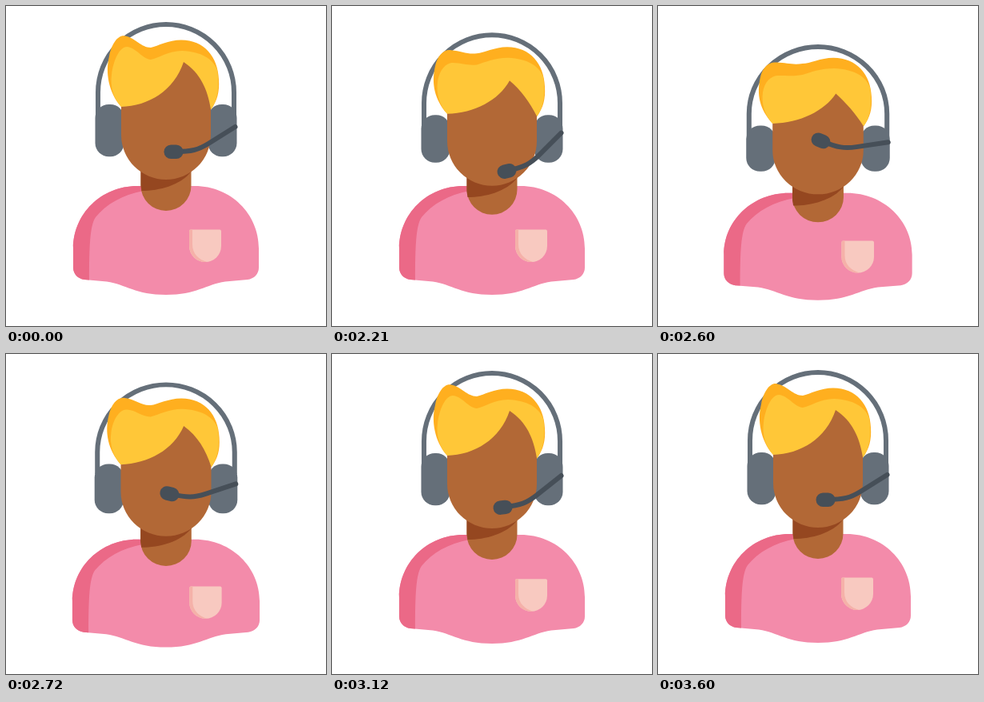
Animation, 400 px wide and 400 px high, one loop 3690 ms. Source, as an HTML page:

```html
<!DOCTYPE html>
<html lang="en">
<head>
<meta charset="utf-8">
<title>Support agent</title>
<style>
  html, body { margin: 0; width: 100%; height: 100%; overflow: hidden; background: #fff; }
  svg { display: block; width: 100vw; height: 100vh; }
</style>
</head>
<body>
<svg viewBox="0 0 400 400">
  <g id="figure">
    <g id="band"><path d="M115 136V108A85 85 0 0 1 285 108V136" fill="none" stroke="#656f79" stroke-width="6"/></g>
    <g fill="#656f79">
      <rect class="pad" x="111.5" width="36" rx="17"/>
      <rect class="pad" x="252.5" width="36" rx="17"/>
    </g>
    <path fill="#f38baa" d="M164 225H236C281 225 316 260 316 303V327C316 335 310 341 302 342L274 344.5C250 348 238 361 200 361C162 361 150 348 126 344.5L98 342C90 341 84 335 84 327V303C84 260 119 225 164 225Z"/>
    <path fill="#eb6987" d="M104 342.5L98 342C90 341 84 335 84 327V303C84 260 119 225 164 225H172V231C145 236 125 248 112 264C105 274 104 300 104 342.5Z"/>
    <g id="pocket">
      <path fill="#f8c9c0" d="M231 279.5H267q2 0 2 2V300a20 20 0 0 1-40 0V281.5q0-2 2-2Z"/>
      <path fill="#f5b1a9" d="M231 279.5H233V298C233 310 241 317 251 319.9A20 20 0 0 1 229 300V281.5q0-2 2-2Z"/>
    </g>
    <path id="neck" fill="#b26836" d="M168.5 195H231.5V224.5A31.5 31.5 0 0 1 168.5 224.5Z"/>
    <path id="shadow" fill="#954720" d="M231.5 200V207C218 224 192 231 169.5 231L168.5 224V200Z"/>
    <g id="head">
      <path id="hair" fill="#ffaf1f"/>
      <path id="fringe" fill="#ffc738"/>
      <path id="face" fill="#b26836"/>
    </g>
    <g id="mic">
      <path d="M286.5 151L253 172C240 180 232 182 212 182" fill="none" stroke="#464f58" stroke-width="6" stroke-linecap="round"/>
      <rect x="197.5" y="173.5" width="24" height="17.5" rx="8.75" fill="#464f58"/>
    </g>
  </g>
</svg>
<script>
const LOOP = 3690, STEP = 30;
const START = 2030, CROUCH = 1998, JUMP = 2210, LAND = 2568, END = 3600;

const el = id => document.getElementById(id);
const set = (id, name, value) => el(id).setAttribute(name, value);
const shift = (id, y) => set(id, 'transform', `translate(0 ${y})`);

function ramp(t, from, to) {
  const u = Math.min(1, Math.max(0, (t - from) / (to - from)));
  return u * u * (3 - 2 * u);
}

// Crouch, ballistic jump, then a damped bounce
function height(t) {
  if (t < JUMP) return 10 * Math.sin(Math.PI * (t - CROUCH) / (JUMP - CROUCH));
  if (t < LAND) {
    const p = (t - JUMP) / (LAND - JUMP);
    return -34 * 4 * p * (1 - p);
  }
  const s = t - LAND;
  return 16.6 * Math.exp(-.0048 * s) * Math.sin(Math.PI * s / 200);
}

// The microphone trails behind the body and settles slowly
function boomAngle(t) {
  const s = t - 2590;
  if (s < 0) return 6 - 19 * ramp(t, START, JUMP) + 37 * ramp(t, JUMP, 2590);
  return 24 * Math.exp(-.0024 * s) * Math.cos(.0054 * s) * (1 - ramp(t, 3200, END));
}

// n is the nod: 0 upright, 1 looking down
function drawHead(n) {
  shift('head', 11 * n);
  set('hair', 'd', `M144 126C128 108 124 ${82 + 7 * n} 129 ${63 + 4 * n}
    C132 ${46 + 7 * n} 141 ${35 + 12 * n} 149 ${37.5 + 11 * n}
    C162 ${40 + 9 * n} 169 52 181 ${52 - 2 * n}
    C190 50 203 42.5 219 42.5C248 42.5 265 64 266 92C267 108 264 118 256.5 129Z`);
  set('fringe', 'd', `M144 126C134 115 130 100 132 86
    C134 ${68 + 5 * n} 142 ${51 + 14 * n} 151 ${51 + 14 * n}
    C163 ${52 + 13 * n} 170 66 181 ${67 - 3 * n}
    C191 ${65 - 4 * n} 203 56 220 56C244 57 259 66 264 80C267 100 265 116 256.5 129Z`);
  set('face', 'd', `M144 126C178 125 ${210 - 2 * n} ${106 + 4 * n} 222 ${70 + 18 * n}
    C${243 - 9 * n} ${84 + 15 * n} ${252 - 6 * n} ${104 + 9 * n} 256 129
    V${161 - 1.4 * n}a56 56 0 0 1-112 0Z`);
}

function draw(time) {
  const t = START + Math.floor((time % LOOP - START) / STEP) * STEP;
  const moving = t >= START && t < END;
  const y = moving ? height(t) : 0;
  const angle = moving ? boomAngle(t) : 0;
  const nod = ramp(t, 2110, 2250) - ramp(t, 2620, 2800);
  const dip = Math.max(y, 0), squash = .0003 * dip * dip;

  set('figure', 'transform',
    `translate(200 ${361 + y}) scale(${1 + squash} ${1 - squash}) translate(-200 -361)`);
  shift('band', 16.6 * nod);
  shift('neck', 6 * nod);
  shift('shadow', 10 * nod);
  shift('pocket', .9 * dip);
  drawHead(nod);
  set('mic', 'transform', `translate(0 ${9.6 * nod}) rotate(${angle} 286.5 151)`);
  for (const pad of document.querySelectorAll('.pad')) {
    pad.setAttribute('y', 123 + 16.6 * nod);
    pad.setAttribute('height', 65.3 - 7.2 * nod);
  }
}

const origin = performance.now();
function loop() {
  draw(performance.now() - origin);
  requestAnimationFrame(loop);
}
loop();
</script>
</body>
</html>
```
